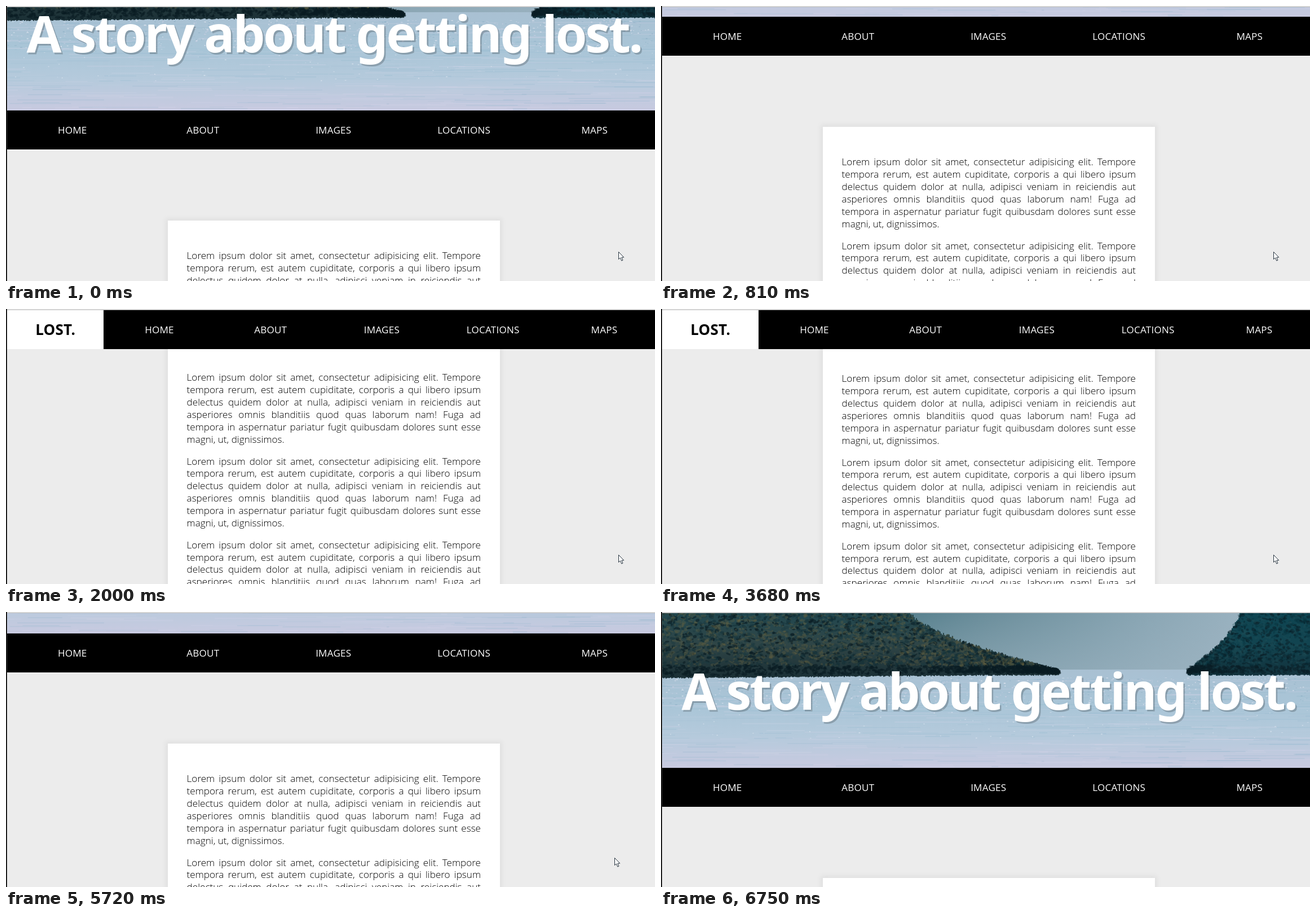
Recreate the animation shown at these times as an HTML page with a canvas. Size 1151 by 487 pixels, loop 7.53 s.

```html
<!DOCTYPE html>
<html lang="en">
<head>
<meta charset="utf-8">
<title>A story about getting lost.</title>
<style>
  html, body { margin: 0; width: 100%; height: 100%; overflow: hidden; background: #ececec; }
  body { position: relative; font: 300 17.1px/21.85px "Open Sans", "Noto Sans", sans-serif; color: #000; }
  #page, nav, canvas, h1, #card, #cursor, .edge { position: absolute; left: 0; top: 0; }
  #page { width: 1151px; }
  canvas { top: -277px; }
  h1 {
    left: 36.5px; top: -183.5px; margin: 0; white-space: nowrap;
    font: 700 90px/90px "Noto Sans", "Open Sans", sans-serif; letter-spacing: -3.2px;
    color: #fff; text-shadow: 2.6px 3.4px 0 rgba(0, 0, 0, .2);
  }
  #card {
    left: 287px; top: 195px; width: 521.4px; padding: 34.3px 33.6px;
    background: #fff; box-shadow: 0 0 8.6px 4.3px rgba(0, 0, 0, .05);
  }
  #card p { margin: 17.14px 0; }
  #card span { display: block; white-space: nowrap; text-align: justify; text-align-last: justify; }
  #card span:last-child { text-align-last: left; }
  nav { left: 2px; width: 1157.5px; height: 69px; display: flex; background: #000; color: #fff; }
  nav div { flex: 1 1 0; display: flex; align-items: center; justify-content: center; font-weight: 400; letter-spacing: .2px; }
  nav #logo { flex: none; overflow: hidden; background: #fff; color: #000; font-size: 26px; font-weight: 700; }
  .edge { background: #000; width: 1px; height: 100%; border-right: 1px solid #444; }
  .top { background: #e9e9e9; width: 100%; height: 1px; border: 0; border-bottom: 1px solid #bdbdbd; }
</style>
</head>
<body>
<div id="page">
  <canvas width="1151" height="277"></canvas>
  <h1>A story about getting lost.</h1>
  <div id="card"></div>
</div>
<nav>
  <div id="logo">LOST.</div>
  <div>HOME</div><div>ABOUT</div><div>IMAGES</div><div>LOCATIONS</div><div>MAPS</div>
</nav>
<div class="edge top"></div>
<div class="edge"></div>
<svg id="cursor" width="14" height="20" viewBox="-.5 -.5 14 20">
  <path d="M0 0V13L3 10.4 5.2 15.6 7.4 14.7 5.3 9.6H9.3Z" fill="#fff" stroke="#26333f"/>
</svg>
<script>
const LOOP = 7530, TICK = 82;
const $ = s => document.querySelector(s);

const lines = [
  'Lorem ipsum dolor sit amet, consectetur adipisicing elit. Tempore',
  'tempora rerum, est autem cupiditate, corporis a qui libero ipsum',
  'delectus quidem dolor at nulla, adipisci veniam in reiciendis aut',
  'asperiores omnis blanditiis quod quas laborum nam! Fuga ad',
  'tempora in aspernatur pariatur fugit quibusdam dolores sunt esse',
  'magni, ut, dignissimos.'
];
$('#card').innerHTML = `<p>${lines.map(l => `<span>${l}</span>`).join('')}</p>`.repeat(5);

// Header landscape: mist, two wooded shores and rippled water
const g = $('canvas').getContext('2d');
const W = 1151, H = 277;
let seed = 7;
const rnd = (a, b) => a + (b - a) * ((seed = seed * 16807 % 2147483647) / 2147483647);
const waterline = x => 118 - 5 * Math.min(1, x / 600);

function fade(x, y, ...colors) {
  const fill = g.createLinearGradient(0, 0, x, y);
  colors.forEach((c, i) => fill.addColorStop(i / (colors.length - 1), c));
  return fill;
}

function band(top, bottom, fill) {
  g.fillStyle = fill;
  g.fillRect(0, top, W, bottom - top);
}

function ripples(count, bottom, width, colors) {
  for (let i = 0; i < count; i++) {
    g.fillStyle = colors[i % colors.length];
    g.fillRect(rnd(-width, W), rnd(117, bottom), rnd(1, width), rnd(.5, 2));
  }
}

// A slope of trees falling from its crest to its tip; dark rocks line the water
function shore(crest, tip, far, fill, leaves) {
  const slope = x => 104 * Math.max(0, (x - crest) / (tip - crest)) ** .65;
  const from = Math.min(far, tip), to = Math.max(far, tip);
  g.fillStyle = fill;
  for (let x = from; x < to; x += 2) {
    const top = slope(x) + rnd(-3, 3);
    g.fillRect(x, top, 2, waterline(x) + rnd(-1, 1) - top);
  }
  for (let i = 0; i < (to - from) * 6; i++) {
    const x = rnd(from, to), top = slope(x), y = top + rnd(0, 1) * (waterline(x) - top - 4);
    g.fillStyle = y > 96 ? leaves[0] : leaves[i % leaves.length];
    g.beginPath();
    g.ellipse(x, y, rnd(1, 5), rnd(1, 3), rnd(-.6, .6), 0, 7);
    g.fill();
  }
}

band(0, 110, fade(W, 0, '#41707e', '#41707e', '#6b8e9b', '#8aa6b4', '#a5bac8'));
band(0, 110, fade(0, 108, 'rgba(160,182,196,0)', 'rgba(160,182,196,.5)'));
band(103, H, fade(0, H, '#a9bdcd', '#a9bdcd', '#a9c1d3', '#a9c5d7', '#b5cadc', '#c8cae0'));
ripples(420, H, 160, ['rgba(120,165,190,.16)', 'rgba(220,216,236,.2)']);
ripples(700, 165, 4, ['rgba(240,238,248,.6)', 'rgba(205,208,228,.6)', 'rgba(120,160,184,.4)']);
ripples(160, 225, 3, ['rgba(235,240,248,.5)']);
shore(440, 706, 0, fade(0, 118, '#214850', '#2f4546', '#1a2f35'),
  ['rgba(10,28,35,.6)', 'rgba(16,46,54,.5)', 'rgba(86,88,62,.4)', 'rgba(28,58,64,.5)', 'rgba(118,106,62,.25)']);
shore(1026, 934, W, fade(0, 118, '#0e4552', '#124450', '#12303a'),
  ['rgba(10,30,38,.5)', 'rgba(6,46,57,.35)', 'rgba(36,80,88,.25)']);

// Scroll strokes: first step, last step, where the menu then lies in the page
const scrolls = [
  [110, 200, 93],
  [560, 810, 19],
  [1340, 1510, -44],
  [1760, 2000, -136],
  [3680, 4085, -44],
  [4170, 4330, 19],
  [5640, 5960, 93],
  [6050, 6130, 276]
];

// Moves in even steps, as a screen recording at a low rate shows it
function progress(t, start, end) {
  if (t < start) return 0;
  const steps = Math.round((end - start) / TICK);
  const done = Math.floor((t - start + 1) / (end - start) * steps);
  return Math.min(1, (done + 1) / (steps + 1));
}
const ease = p => p < .5 ? 4 * p ** 3 : 1 - 4 * (1 - p) ** 3;

function draw(now) {
  const t = now % LOOP;

  let y = 185;
  for (const [start, end, to] of scrolls) y += (to - y) * ease(progress(t, start, end));
  y = Math.round(y);

  const fixed = t >= 1340 && t < 4250;
  const open = progress(t, 1340, 1510) - progress(t, 4170, 4330);
  $('#page').style.top = y + 'px';
  $('nav').style.top = (fixed ? 2 : y) + 'px';
  $('#logo').style.width = 171.4 * open + 'px';

  const drift = progress(t, 6500, 6660);
  const x = t < 4550 ? 1086 : 1079 + 28 * drift;
  const hidden = t >= 4550 && t < 5640 || t >= 6750;
  const cursor = $('#cursor').style;
  cursor.transform = `translate(${x}px, ${435 + 32 * drift}px)`;
  cursor.opacity = hidden ? 0 : t >= 4470 && t < 4550 ? .5 : 1;
}

const begin = performance.now();
function tick() {
  draw(performance.now() - begin);
  requestAnimationFrame(tick);
}
tick();
</script>
</body>
</html>
```
